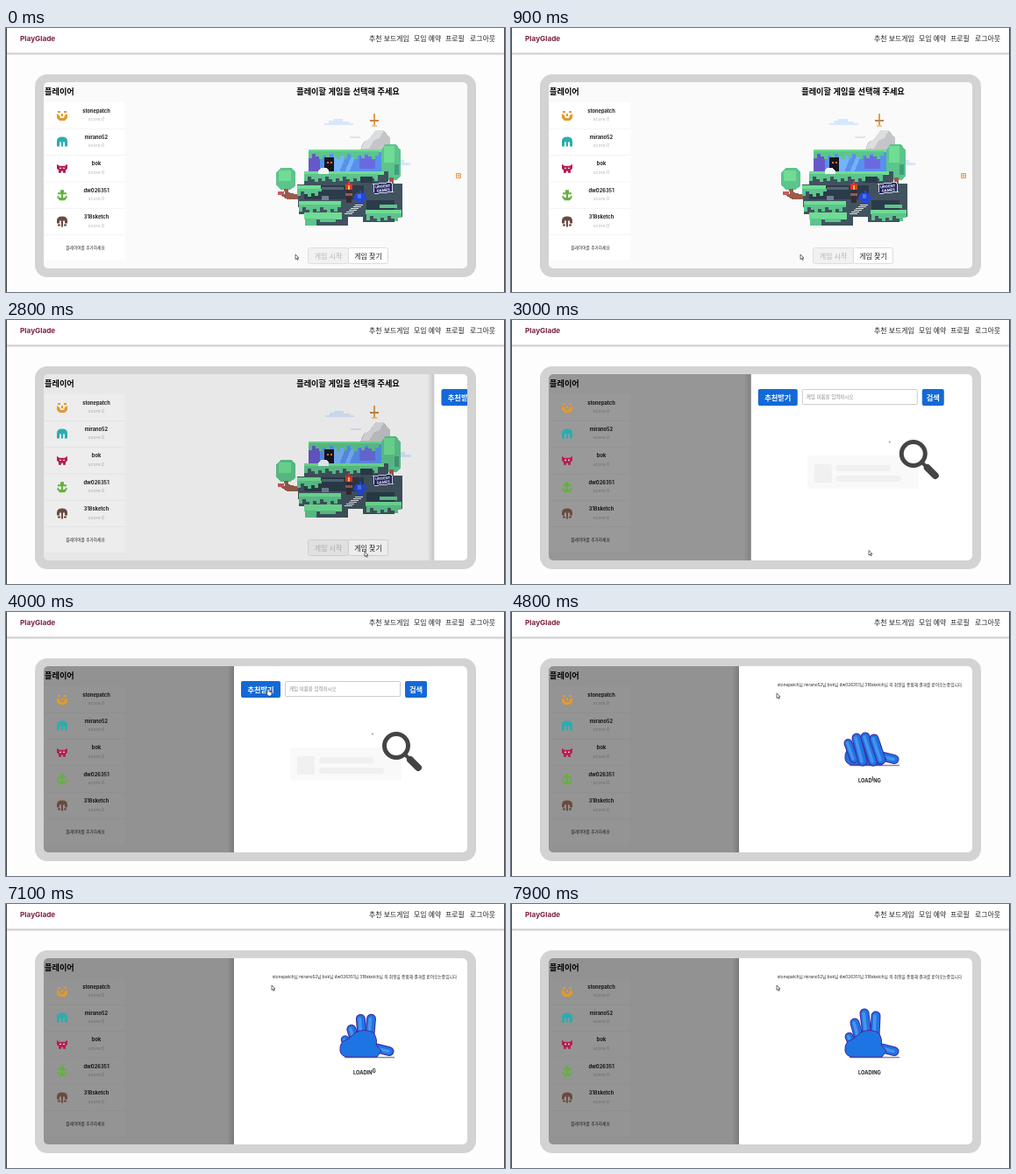
These frames come from a looping animation (569x302 px, 8 s). An HTML page:

```html
<!DOCTYPE html>
<html lang="ko">
<head>
<meta charset="utf-8">
<style>
html, body { margin: 0; width: 100%; height: 100%; overflow: hidden; background: #fdfdfd }
svg { display: block; width: 569px; height: 302px }
text { font-family: Inter, "Noto Sans CJK KR", "Noto Sans CJK", sans-serif; fill: #222 }
.ko { font-family: "Noto Sans CJK KR", "Noto Sans CJK", sans-serif }
.b { font-weight: 700 }
.k { font-weight: 900; fill: #000 }
.m { text-anchor: middle }
</style>
</head>
<body>
<svg viewBox="0 0 569 302">
  <defs>
    <clipPath id="inner"><rect x="43" y="62" width="483" height="213" rx="5"/></clipPath>
    <linearGradient id="edge"><stop stop-color="#000" stop-opacity="0"/><stop offset="1" stop-color="#000" stop-opacity=".16"/></linearGradient>
    <linearGradient id="drop" x2="0" y2="1"><stop stop-color="#bbb"/><stop offset="1" stop-color="#fdfdfd"/></linearGradient>
  </defs>
  <rect width="569" height="29" fill="#fff"/>
  <rect y="28.5" width="569" height="3" fill="url(#drop)"/>
  <path d="M.5 0V302M568.5 0V302" stroke="#444"/>
  <text x="16" y="15" class="b" font-size="8.2" style="fill:#7d2340">PlayGlade</text>
  <g id="nav" class="ko" font-size="7.9"></g>
  <rect x="33" y="53" width="503" height="232" rx="14" fill="#d3d3d3"/>
  <g clip-path="url(#inner)">
    <rect x="43" y="62" width="483" height="213" fill="#fafafa"/>
    <g id="players"></g>
    <text x="390" y="76" class="ko k m" font-size="9.2">플레이할 게임을 선택해 주세요</text>
    <g id="scene" shape-rendering="crispEdges"></g>
    <path d="M513.5 166.5h5v5h-5zM514.5 169h3M516 167.5v3" fill="#fff3e2" stroke="#e09a48"/>
    <rect x="344.500" y="251.500" width="46" height="18" rx="2" fill="#f1f1f1" stroke="#dedede"/>
    <text x="367.500" y="263.500" class="ko m" font-size="8" style="fill:#b5b5b5">게임 시작</text>
    <rect id="find" x="390.500" y="251.500" width="45" height="18" rx="2" fill="#fff"/>
    <text id="findText" x="413" y="263.500" class="ko m" font-size="8">게임 찾기</text>
    <rect id="mask" x="43" y="62" width="483" height="213"/>
    <g id="icons"></g>
    <g id="drawer">
      <rect x="252" y="62" width="8" height="213" fill="url(#edge)"/>
      <rect x="260" y="62" width="267" height="213" fill="#fff"/>
      <g id="search">
        <g fill="#1469d6"><rect x="268" y="79" width="45" height="19" rx="2"/><rect x="455" y="79" width="25" height="19" rx="2"/></g>
        <g class="ko b m" font-size="8.2"><text x="290.500" y="91.500" style="fill:#fff">추천받기</text><text x="467.500" y="91.500" style="fill:#fff">검색</text></g>
        <rect x="318.500" y="79.500" width="131" height="17" rx="1" fill="#fff" stroke="#ccc"/>
        <text x="323" y="90" class="ko" font-size="5.5" style="fill:#888">게임 이름을 입력하시오</text>
        <rect x="324" y="155" width="127" height="38" rx="2" fill="#f9f9f9"/>
        <g fill="#f0f0f0"><rect x="332" y="165" width="20" height="21" rx="2"/><rect x="357" y="166" width="62" height="7" rx="3"/><rect x="357" y="178" width="74" height="7" rx="3"/></g>
        <circle cx="418" cy="139.500" r="1" fill="#999"/>
        <circle cx="445" cy="153" r="13.500" fill="#fff" stroke="#444" stroke-width="5"/>
        <path d="M455 163l5 5" stroke="#444" stroke-width="4"/>
        <path d="M461 169l9 9" stroke="#444" stroke-width="8" stroke-linecap="round"/>
      </g>
      <g id="loader">
        <text id="wait" x="409" y="84.500" class="m" font-size="4.7"></text>
        <path d="M386 175.500H443" stroke="#8d8791" stroke-width="1.500"/>
        <g id="hand"></g>
        <text id="letters" x="396" y="195" class="b" font-size="5.700"></text>
      </g>
    </g>
  </g>
  <g id="cursor" stroke="#333" stroke-width=".7" fill="#fff">
    <path id="arrow" d="M0 0V5.500L1.300 4.400L2.200 6.400L3.200 6L2.300 4H4Z"/>
    <path id="pointer" d="M1 0q1 0 1 1V3L5 3.700V6L4 8H1L-1 5V4L0 4.500V1Q0 0 1 0Z"/>
  </g>
</svg>
<script>
const $ = id => document.getElementById(id);
const LOOP = 8000;
const clamp = v => Math.max(0, Math.min(1, v));
const ramp = (t, a, b) => clamp((t - a) / (b - a));
const smooth = p => p * p * (3 - 2 * p);
const lerp = (a, b, p) => a + (b - a) * p;
const rect = (x, y, w, h, c) => `<rect x="${x}" y="${y}" width="${w}" height="${h}" fill="${c}"/>`;
const shape = (d, c) => `<path d="${d}" fill="${c}"/>`;

$('nav').innerHTML = [[414, '추천 보드게임'], [465, '모임 예약'], [501, '프로필'], [529, '로그아웃']]
  .map(([x, s]) => `<text class="ko" x="${x}" y="15">${s}</text>`).join('');

// Player list
const names = ['stonepatch', 'mirano52', 'bok', 'dw026351', '318sketch'];
const icons = [
  shape('M-6-2L-3 0L-2 3H2L3 0L6-2V3L3 6H-3L-6 3ZM-5-5h3v2h-3zM2-5h3v2h-3zM-1-2h2v3h-2z', '#e39a2d'),
  shape('M-6 5V-1Q-6-6 0-6Q6-6 6-1V5H3V0H1V5H-1V0H-3V5Z', '#2cacb0'),
  shape('M-6-5L-3-3H3L6-5V0L4 2V5H1V3H-1V5H-4V2L-6 0Z', '#b51f55') + rect(-3, -1, 2, 1, '#fff') + rect(1, -1, 2, 1, '#fff'),
  shape('M-2-6H2V-3H5V-1H1V3L4 2V0L6 2L3 6H-3L-6 2L-4 0V2L-1 3V-1H-5V-3H-2Z', '#62b23c'),
  shape('M-6 2V-1Q-6-6 0-6Q6-6 6-1V2H3V-1H1V6H-1V-1H-3V2ZM-5 3h3v2h-3zM2 3h3v2h-3z', '#6b4a40')
];
const rowY = i => 94.5 + i * 30.4;
$('players').innerHTML = '<text x="44" y="76" class="ko k" font-size="9.200">플레이어</text>' +
  rect(44, 85, 92, 181, '#fff') +
  names.map((n, i) => rect(44, 115 + i * 30.3, 92, .7, '#efefef') +
    `<text class="b m" x="103" y="${rowY(i) + 2}" font-size="5.700">${n}</text>
     <text class="m" x="103" y="${rowY(i) + 11.5}" font-size="5.200" style="fill:#b4b4b4">score:0</text>`).join('') +
  '<text class="ko m" x="90.500" y="252.500" font-size="4.700">플레이어를 추가하세요</text>';
$('icons').innerHTML = icons.map((s, i) => `<g transform="translate(64 ${rowY(i) + 5.5})">${s}</g>`).join('');
$('wait').textContent = names.map(n => n + '님').join(' ') + ' 의 취향을 종합해 결과를 받아오는중입니다';

// Island picture
const grass = '#70dc94', leaf = '#5cc48c', rock = '#40535f', dark = '#2c3b49', wood = '#9a5b4a';
const drips = (x, y, n, c) => Array.from({length: n}, (_, i) => rect(x + i * 4, y, 4, 3 + (i * 7 + 3) % 5 * 1.5, c)).join('');
$('scene').innerHTML =
  `<g id="clouds">${shape('M363 111V109H368V106H373V104H384V107H391V109H396V111Z', '#d8e6fb')}
   ${rect(392, 124, 12, 1.5, '#dde6f3')}${shape('M440 157V154H446V151H454V154H461V157Z', '#d8e6fb')}</g>` +
  shape('M403 141L408 130L414 127L421 117H431L438 126V150H403Z', '#c4c5c9') +
  shape('M421 117H431L426 126L420 128L414 138H405L409 130L414 127Z', '#dcdddf') +
  rect(419, 98, 2, 14, '#d9a25a') + rect(415, 105, 10, 2, '#c88740') + rect(417, 111, 6, 2, '#efc98c') +
  // house
  rect(345, 140, 84, 26, '#6658c8') + rect(358, 140, 70, 25, '#5791ec') +
  shape('M375 140H390L380 165H372ZM397 140H402L391 165H386Z', '#75b2f6') + rect(403, 146, 18, 15, '#6a6ae0') +
  rect(345, 139, 84, 3, grass) + drips(345, 141, 20, leaf) +
  rect(363, 148, 11, 17, '#15151f') + rect(366, 153, 2, 2, '#ed7430') + rect(370, 153, 2, 2, '#ed7430') +
  // trees
  shape('M428 169V140L432 133H445L450 140V170L445 174H433Z', leaf) + rect(431, 135, 12, 19, grass) + rect(443, 156, 5, 12, '#439d7b') +
  rect(437, 171, 5, 29, wood) +
  shape('M308 180V166L313 160H325L330 165V181L324 185H313Z', leaf) + rect(311, 163, 14, 12, grass) +
  shape('M317 184H322V188L334 191V196H321L314 192V190H318Z', wood) + rect(310, 187, 7, 4, '#c55b5f') +
  // ground
  shape('M332 179H340V164H436V178H452V216H443V222H407V216H390V226H341V213H334Z', rock) +
  rect(340, 180, 68, 16, dark) + rect(411, 197, 32, 12, dark) +
  rect(340, 164, 91, 4, grass) + drips(340, 167, 21, leaf) +
  rect(332, 180, 27, 5, grass) + drips(332, 184, 7, leaf) + rect(360, 182, 25, 3, '#526774') +
  rect(334, 198, 48, 5, grass) + drips(334, 202, 12, leaf) +
  rect(340, 211, 43, 8, grass) + rect(341, 218, 13, 8, leaf) + rect(358, 218, 18, 4, leaf) +
  rect(410, 208, 41, 5, grass) + drips(411, 212, 10, leaf) + rect(426, 202, 20, 4, leaf) +
  rect(360, 192, 8, 5, '#6e8290') + rect(404, 170, 14, 7, dark) +
  Array.from({length: 6}, (_, i) => rect(398 - i * 2.5, 202 + i * 2, 9, 1.3, '#e4e7e9')).join('') +
  `<g id="ghost">${shape('M356 167V163L359 160H365L368 163V167Z', '#f2f3f8')}</g>` +
  rect(388, 183, 6, 17, '#342c37') + rect(387, 189, 8, 3, wood) +
  `<g id="fire">${shape('M387 185V178L389 180L391 174L393 179L395 177V185Z', '#df3430')}${rect(390, 180, 2, 5, '#ffc13d')}</g>` +
  `<g id="crystal">${shape('M397 191L400 188L402 190L404 185L406 189L410 188L409 192L412 195L408 197V201H400V197L396 195Z', '#2746d2')}${rect(401, 190, 4, 5, '#4776ef')}</g>` +
  `<g transform="rotate(-6 430 183)">${rect(419, 177, 22, 12, '#d8d4e8')}${rect(420, 178, 20, 10, '#202660')}
   <text class="b m" x="430" y="182.500" font-size="4.200" style="fill:#fff">URGENT</text>
   <text class="b m" x="430" y="187" font-size="4.200" style="fill:#fff">GAMES</text></g>`;

// Drumming hand; each finger: knuckle and tip when raised, then when folded
const fingers = [
  [391, 164, 385, 150, 384.5, 150, 391, 168],
  [398, 157, 392, 136, 394, 144, 401, 171],
  [406, 150, 403, 125, 404, 143, 413, 171],
  [415, 150, 416, 128, 414, 145, 422, 169]
];
const ink = '#46269c';
const limb = (x1, y1, x2, y2, w) => [[ink, w], ['#1d74e3', w - 2]]
  .map(([c, s]) => `<path d="M${x1} ${y1}L${x2} ${y2}" stroke="${c}" stroke-width="${s}" stroke-linecap="round"/>`).join('') +
  `<path d="M${x1 - 1} ${y1}L${x2 - 1} ${y2}" stroke="#4794ec" stroke-width="${w / 3}" stroke-linecap="round"/>`;
const palm = `<path d="M381 168Q380 157 389 155L399 147Q408 142 419 147Q424 155 422 161L428 168L423 175H389Q382 174 381 168Z" fill="#1d74e3" stroke="${ink}"/>`;

function drawHand(t) {
  const beat = t % 900;
  const parts = fingers.map((f, i) => {
    const rise = 390 + (3 - i) * 45 + (i < 2 ? 55 : 0);
    const fall = 730 + i * 12;
    const up = smooth(ramp(beat, rise, rise + 150)) * (1 - smooth(ramp(beat, fall, fall + 200)));
    const p = [0, 1, 2, 3].map(k => lerp(f[k + 4], f[k], up));
    return {up, svg: limb(...p, i ? 11 : 10)};
  });
  const pick = test => parts.filter(test).map(p => p.svg).join('');
  $('hand').innerHTML = pick(p => p.up > .5) + limb(423, 165, 437, 168.5, 11) + palm + pick(p => p.up <= .5);
}

function drawLetters(t) {
  const head = ((t - 5900) / 100 + 1 + 7.15 * 20) % 7.15;
  let last = 0;
  $('letters').innerHTML = [...'LOADING'].map((c, i) => {
    const d = Math.abs(head - i);
    const y = d < .7 ? -2.5 * Math.cos(d / .7 * Math.PI / 2) : 0;
    const dy = y - last;
    last = y;
    return `<tspan dy="${dy}">${c}</tspan>`;
  }).join('');
}

// time, x, y
const route = [[0, 330, 259], [1000, 330, 259], [1700, 409, 265], [2780, 409, 265], [3000, 408, 263.5],
  [3150, 408, 263.5], [3900, 298, 88], [4250, 298, 88], [4500, 303, 93], [LOOP, 303, 93]];
function drawCursor(t) {
  const i = route.findIndex(p => p[0] > t), a = route[i - 1], b = route[i];
  const p = smooth(ramp(t, a[0], b[0]));
  $('cursor').setAttribute('transform', `translate(${lerp(a[1], b[1], p)} ${lerp(a[2], b[2], p)})`);
  const link = t >= 1650 && t < 2780 || t >= 3850 && t < 4200;
  show('pointer', link);
  show('arrow', !link);
}

const show = (id, on) => $(id).style.display = on ? '' : 'none';
const move = (id, x, y) => $(id).setAttribute('transform', `translate(${x} ${y})`);

function draw(t) {
  const wave = Math.sin(t / 1000 * Math.PI);
  move('clouds', wave, 0);
  move('ghost', 1 - Math.cos(t * Math.PI / 700), 0);
  move('fire', 0, Math.floor(t / 200) % 2);
  move('crystal', 0, Math.floor(t / 400) % 2 ? -1 : 0);

  const hover = t >= 1650 && t < 2780;
  $('find').setAttribute('stroke', hover ? '#58a9f5' : '#dcdcdc');
  $('findText').style.fill = hover ? '#2b8ef0' : '#222';

  const open = 1 - (1 - ramp(t, 2780, 3130)) ** 3;
  move('drawer', 275 * (1 - open), 0);
  $('mask').setAttribute('opacity', .42 * open);
  const loading = t >= 4200;
  show('search', !loading);
  show('loader', loading);
  if (loading) {
    drawHand(t);
    drawLetters(t);
  }
  drawCursor(t);
}

function frame() {
  draw(performance.now() % LOOP);
  requestAnimationFrame(frame);
}
frame();
</script>
</body>
</html>
```
